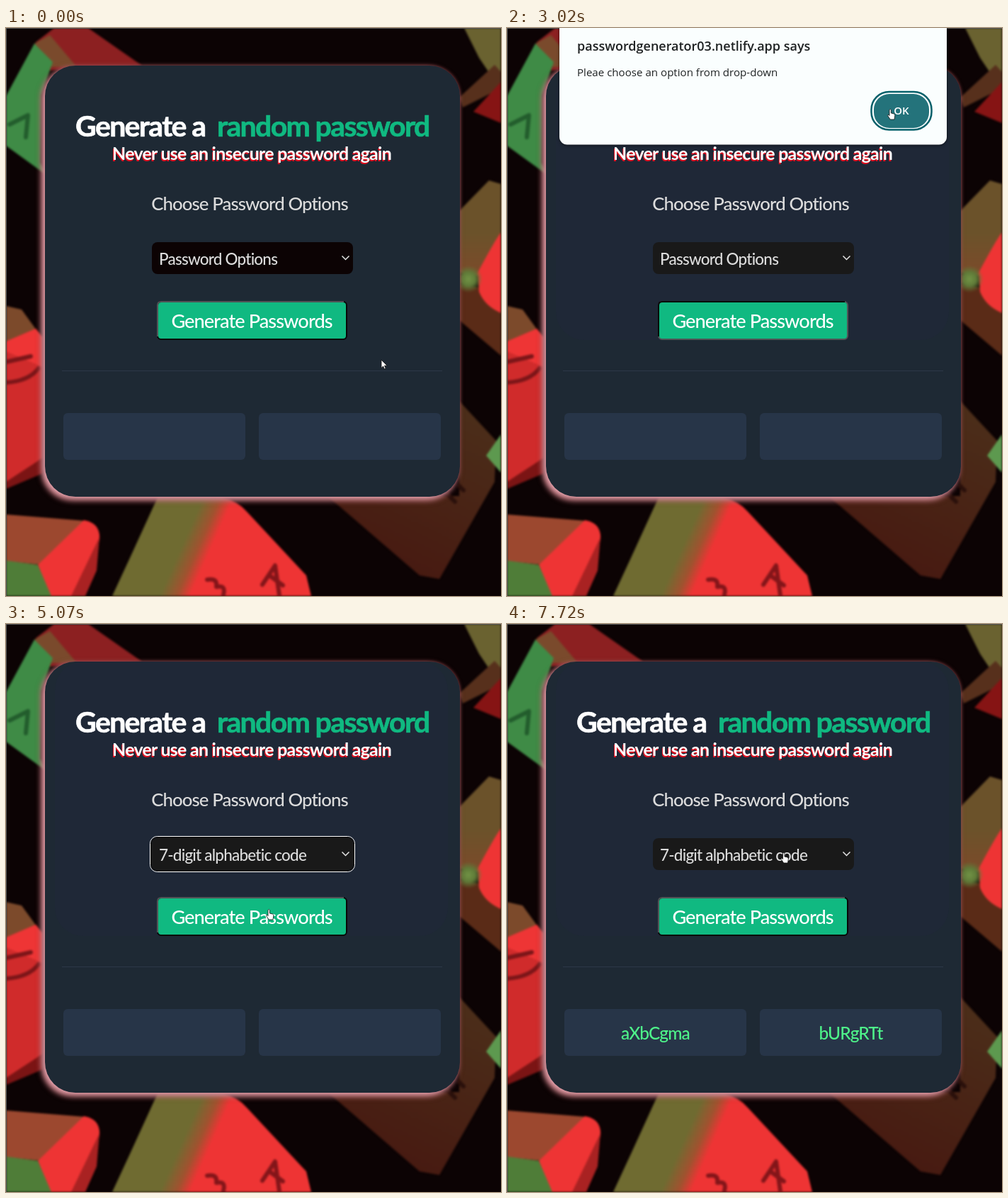
Recreate the animation shown at these times as an HTML page. Size 699 by 801 pixels, loop 8 s.

```html
<!DOCTYPE html>
<html lang="en">
<head>
<meta charset="utf-8">
<title>Random password generator</title>
<style>
  html, body { margin: 0; height: 100%; overflow: hidden; background: #0c0304; }
  svg { display: block; width: 100vw; height: 100vh; }
  text { font-family: Lato, sans-serif; font-weight: 500; letter-spacing: -.035em; fill: #dcdcdc; }
  .bold { font-weight: 700; fill: #fff; }
  .title { font-size: 41px; letter-spacing: -.04em; stroke: #fff; stroke-width: .7; }
  .accent { fill: #10b981; stroke: #10b981; }
  .subtitle { font-size: 25px; letter-spacing: -.03em; text-shadow: -1px 2px 0 #e01020; }
  .option { font-size: 22.5px; }
  .code { font-size: 24.5px; fill: #4ef58a; text-anchor: middle; }
  .mid { text-anchor: middle; }
  #keys { filter: blur(1.5px); }
  #panel { filter: drop-shadow(-4px 4px 4px #e8a6b0) drop-shadow(0 0 2px #7a3034); }
  #dialog text { font-family: "Open Sans", sans-serif; letter-spacing: 0; fill: #1f2223; }
  #dialog .plain { font-weight: 400; }
  #sheet { filter: drop-shadow(0 1px 2px #0008); }
  #menu { filter: drop-shadow(0 5px 8px #0004); }
  .line { fill: none; stroke-width: 2; }
  .thin { fill: none; stroke-width: 1; }
  .engrave { fill: none; stroke-width: 6; stroke-linecap: round; stroke-linejoin: round; }
</style>
</head>
<body>
<svg viewBox="0 0 699 801" preserveAspectRatio="none">
  <defs>
    <linearGradient id="oliveToRed" gradientUnits="userSpaceOnUse" x1="255" y1="715" x2="300" y2="735">
      <stop stop-color="#6f6b31"/><stop offset=".45" stop-color="#a0522f"/><stop offset=".8" stop-color="#ee3434"/>
    </linearGradient>
    <linearGradient id="brown" gradientUnits="userSpaceOnUse" x1="660" y1="550" x2="560" y2="760">
      <stop stop-color="#4b2d19"/><stop offset="1" stop-color="#471a11"/>
    </linearGradient>
    <linearGradient id="oliveToBrown" x2="0" y2="1">
      <stop offset=".55" stop-color="#6b522a"/><stop offset="1" stop-color="#7c4a2a"/>
    </linearGradient>
    <radialGradient id="glow">
      <stop stop-color="#719345"/><stop offset=".5" stop-color="#5f7a38"/><stop offset="1" stop-color="#5f7a3800"/>
    </radialGradient>
  </defs>
  <rect width="699" height="801" fill="#0c0304"/>

  <!-- blurred keyboard keys behind the card -->
  <g id="keys">
    <path fill="#8c2021" d="M42 20L68 0H116L192 53 60 60Z"/>
    <path fill="#7a4a2c" d="M40 22L62 10 100 55H60Z"/>
    <path fill="#3f8b46" d="M0 96L40 22 66 48 50 95 49 190 58 208 0 166Z"/>
    <path class="engrave" stroke="#225c2c" d="M5 136L31 123 28 154"/>
    <path fill="#6a6230" d="M647 0H699V88L668 42Z"/>
    <path fill="#57301c" d="M640 98L690 52 699 62V85L645 112Z"/>
    <path fill="#861414" d="M660 118L699 76V134Z"/>
    <path fill="url(#oliveToBrown)" d="M640 258L682 215 699 220V305L668 350 640 345Z"/>
    <path fill="#5a2b17" d="M640 362L668 366 699 395V462L640 412Z"/>
    <path fill="#ee3434" d="M666 345Q690 300 699 288V402Q676 392 668 372Z"/>
    <ellipse cx="653" cy="354" rx="20" ry="19" fill="url(#glow)"/>
    <path fill="url(#brown)" d="M640 526L692 582 690 640 612 777 584 772 454 660H640Z"/>
    <path class="engrave" stroke="#2a100b" d="M624 658L634 668M640 646L646 652"/>
    <path fill="#5d994f" d="M678 603L699 573V627Z"/>
    <path fill="#7c4a2b" d="M0 392L22 397 46 430 0 442Z"/>
    <path fill="#7b1414" d="M0 636L52 600V628L0 650Z"/>
    <path fill="#d02b2b" d="M0 442L42 424 52 436V606L0 640Z"/>
    <path fill="#ee3535" d="M0 442L42 424 52 436V478L0 456Z"/>
    <path class="engrave" stroke="#7b1518" d="M0 471L35 463M0 500Q32 498 46 480"/>
    <path fill="#9c482f" d="M0 686L112 695 50 757 0 752Z"/>
    <path fill="#ee3434" d="M110 694Q134 698 132 722L104 801H62L45 757Z"/>
    <path fill="#a92222" d="M132 718L128 765 112 801H92Z"/>
    <path fill="#4f7d38" d="M0 751L45 757 64 801H0Z"/>
    <path fill="url(#oliveToRed)" d="M214 662H306Q326 666 340 682L424 772 431 801H150L176 745Z"/>
    <path class="engrave" stroke="#831519" d="M284 778Q299 775 297 788 311 785 307 799M362 785L380 758 386 800M372 772L391 786"/>
  </g>
  <path class="thin" stroke="#555" d="M0 .5H699M.5 0V801"/>

  <rect id="panel" x="55" y="53" width="586" height="608" rx="43" fill="#1e2934"/>
  <rect id="tint" x="69" y="53" width="555" height="387" rx="40" fill="#1f2837"/>

  <text class="bold title" x="98" y="153">Generate a</text>
  <text class="bold title accent" x="298" y="153">random password</text>
  <text class="bold subtitle mid" x="347" y="186">Never use an insecure password again</text>
  <text class="mid" x="344" y="257" font-size="25.8">Choose Password Options</text>

  <g id="focus">
    <rect class="thin" x="203.5" y="299.5" width="289" height="50" rx="10" stroke="#fff"/>
    <rect class="line" x="205" y="301" width="286" height="47" rx="9" stroke="#101010"/>
  </g>
  <rect id="select" x="206" y="302" width="284" height="45" rx="8"/>
  <text id="chosen" class="option" x="216" y="334"></text>
  <path class="thin" stroke="#e4e4e4" style="stroke-width:1.5" d="M474.5 321.5L479.5 326.5 484.5 321.5"/>

  <rect id="button" class="line" x="214" y="386" width="267" height="53" rx="5" style="fill:#10b981"/>
  <path id="edgeTop" class="line" d="M214 435V391Q214 386 219 386H477"/>
  <text class="mid" x="347" y="423" font-size="27.2" style="fill:#fff">Generate Passwords</text>

  <path class="thin" stroke="#2d3847" d="M79 483.5H616"/>
  <rect x="81" y="543" width="257" height="66" rx="6" fill="#273548"/>
  <rect x="357" y="543" width="257" height="66" rx="6" fill="#273548"/>
  <text id="codeA" class="code" x="209.5" y="586"></text>
  <text id="codeB" class="code" x="485.5" y="586"></text>

  <g id="menu">
    <rect x="206.5" y="347.5" width="283" height="110" rx="7" fill="#191919" stroke="#5c5f63"/>
    <rect id="highlight" x="207" width="282" height="36.5" rx="2" fill="#1967d2"/>
    <text class="option" x="217" y="375">4-digit numeric code</text>
    <text class="option" x="217" y="412">7-digit alphabetic code</text>
    <text class="option" x="217" y="448">15-digit alphanumeric code</text>
  </g>

  <g id="dialog">
    <rect id="sheet" x="74" y="-40" width="547" height="204.5" rx="11" fill="#fafefe"/>
    <text x="99" y="32" font-size="18" style="font-weight:600">passwordgenerator03.netlify.app says</text>
    <text class="plain" x="99" y="67.5" font-size="15.1">Pleae choose an option from drop-down</text>
    <rect x="514.5" y="90" width="85" height="53.5" rx="25" fill="none" stroke="#05606a" stroke-width="2.5"/>
    <rect id="ok" x="518" y="93" width="78" height="48" rx="22"/>
    <text class="mid" x="557" y="122" font-size="15" style="font-weight:600;fill:#fff">OK</text>
  </g>

  <g id="cursor" stroke-linejoin="round">
    <path id="arrow" fill="#fff" stroke="#111" stroke-width=".8" d="M0 0V11.5L2.6 9 4.4 13 6.2 12.2 4.5 8.2H8.2Z"/>
    <path id="hand" fill="#fff" stroke="#111" stroke-width=".8" d="M3 1.5Q4.2-.5 5.4 1.5V6L9.5 7Q11 7.5 10.8 9.5L10 15H4.2L.6 9.6Q.4 7.8 2 8.6L3 9.6Z"/>
    <path id="beam" fill="none" stroke="#a8acb0" d="M0 .5H6M3 .5V11.5M0 11.5H6"/>
  </g>
</svg>

<script>
const LOOP = 8000;
const $ = id => document.getElementById(id);
const show = (id, on) => $(id).setAttribute('visibility', on ? 'visible' : 'hidden');
const set = (id, name, value) => $(id).setAttribute(name, value);
const within = (t, from, to) => t >= from && t < to;
const latest = (list, t) => list.findLast(item => item[0] <= t);

// first step time, last step time, steps, pointer, end x, end y
const moves = [
  [0, 0, 1, 'arrow', 530, 468],
  [120, 120, 1, 'arrow', 582, 482],
  [250, 380, 2, 'arrow', 450, 452],
  [510, 510, 1, 'hand', 397, 418],
  [1380, 1510, 2, 'arrow', 490, 38],
  [1650, 1650, 1, 'arrow', 518, 63],
  [1960, 2220, 3, 'arrow', 545, 108],
  [2350, 2350, 1, 'hand', 537, 114],
  [3320, 3320, 1, 'beam', 539.5, 109.5],
  [3440, 3690, 3, 'arrow', 450, 270],
  [3820, 3950, 2, 'hand', 386, 322],
  [4250, 4520, 3, 'arrow', 376.5, 383],
  [4670, 4820, 2, 'arrow', 370, 402],
  [5070, 5070, 1, 'hand', 367, 402],
  [5220, 5220, 1, 'hand', 351, 416],
  [5930, 5930, 1, 'hand', 351, 413.5],
  [7030, 7300, 3, 'arrow', 376, 372],
  [7440, 7720, 3, 'hand', 386.5, 322]
];

const codes = [
  [0, '', ''],
  [5650, 'YyZKgBm', 'rTKloiv'],
  [6330, 'kMvRtQe', 'nHwLsiu'],
  [6880, 'aXbCgma', 'bURgRTt']
];

// start, opacity, vertical offset
const dialogStates = [
  [0, 0, 0], [810, .4, -18], [960, .92, -8.5], [1110, 1, 0], [3170, .4, -6], [3320, 0, 0]
];

const presses = [[810, 3170], [5500, 5650], [6210, 6330], [6760, 6880]];

function pointerAt(t) {
  const index = moves.findLastIndex(move => move[0] <= t);
  const [first, last, steps, kind, x, y] = moves[index];
  const [fromX, fromY] = moves[Math.max(0, index - 1)].slice(4);
  const progress = last > first ? (t - first) / (last - first) : 1;
  const k = Math.min(1, (Math.floor(progress * (steps - 1)) + 1) / steps);
  return { kind, x: fromX + (x - fromX) * k, y: fromY + (y - fromY) * k };
}

function draw(t) {
  const pointer = pointerAt(t);
  set('cursor', 'transform', `translate(${pointer.x} ${pointer.y})`);
  for (const kind of ['arrow', 'hand', 'beam']) show(kind, kind === pointer.kind);

  const [, opacity, offset] = latest(dialogStates, t);
  set('dialog', 'opacity', opacity);
  set('dialog', 'transform', `translate(0 ${offset})`);
  set('ok', 'fill', t < 2350 ? '#045c66' : '#24737b');

  const pressed = presses.some(([from, to]) => within(t, from, to));
  set('edgeTop', 'stroke', pressed ? '#080808' : '#505456');
  set('button', 'stroke', pressed ? '#505456' : '#080808');

  show('tint', t >= 3020);
  set('select', 'fill', t < 3020 ? '#0c0304' : '#191919');
  show('focus', within(t, 5070, 5500));
  $('chosen').textContent = t < 5070 ? 'Password Options' : '7-digit alphabetic code';

  const open = within(t, 4100, 5070);
  const row = Math.floor((pointer.y - 348) / 36.3);
  show('menu', open);
  show('highlight', open && row >= 0);
  set('highlight', 'y', 348 + row * 36.3);

  [, $('codeA').textContent, $('codeB').textContent] = latest(codes, t);
}

function tick() {
  draw(performance.now() % LOOP);
  requestAnimationFrame(tick);
}
tick();
</script>
</body>
</html>
```
